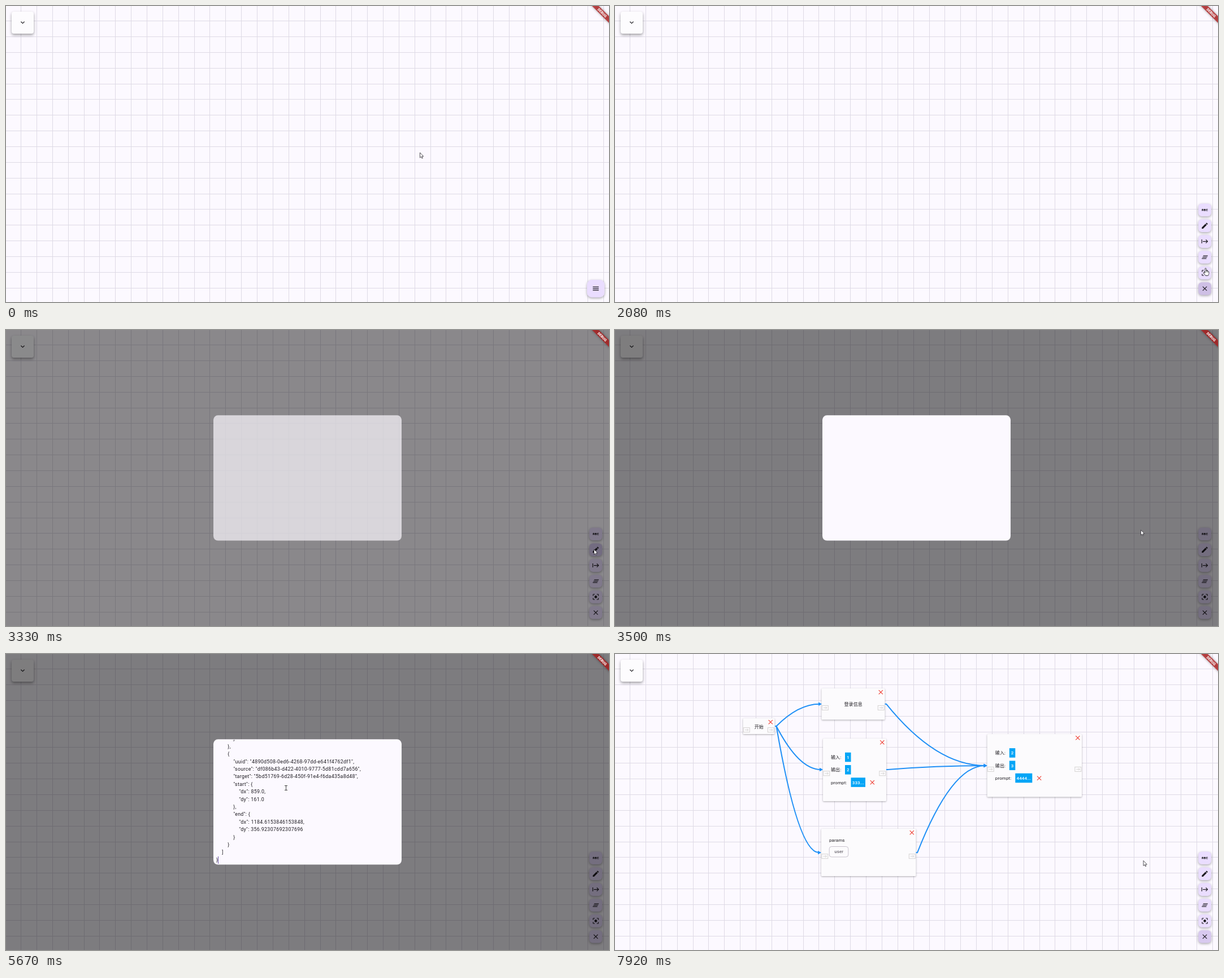
Animation, 1067 px wide and 525 px high, one loop 8000 ms. Source, as an HTML page with a canvas:

```html
<!DOCTYPE html>
<html lang="zh">
<head>
<meta charset="utf-8">
<title>Flow editor</title>
<style>
html, body { margin: 0; width: 100%; height: 100%; overflow: hidden; background: #fcf9ff; }
canvas { display: block; }
</style>
</head>
<body>
<canvas id="stage" width="1067" height="525"></canvas>
<script>
const W = 1067, H = 525, LOOP = 8000, STEP = 1000 / 12;
const ctx = document.getElementById('stage').getContext('2d');
const FONT = 'Roboto, "Noto Sans CJK SC", "Noto Sans CJK", sans-serif';
const SURFACE = '#fcf9ff', EDGE = '#2090f6', BADGE = '#03a5f6', RED = '#ee3b30', INK = '#1d1b20';

// 24-unit icon outlines
const ICONS = {
  menu: 'M3 18h18v-2H3zM3 13h18v-2H3zM3 6v2h18V6z',
  close: 'M19 6.41L17.59 5 12 10.59 6.41 5 5 6.41 10.59 12 5 17.59 6.41 19 12 13.41 17.59 19 19 17.59 13.41 12z',
  more: 'M16.59 8.59L12 13.17 7.41 8.59 6 10l6 6 6-6z',
  focus: 'M12 8a4 4 0 1 0 0 8a4 4 0 1 0 0-8zM5 15H3v4c0 1.1.9 2 2 2h4v-2H5zM5 5h4V3H5c-1.1 0-2 .9-2 2v4h2zM19 3h-4v2h4v4h2V5c0-1.1-.9-2-2-2zM19 19h-4v2h4c1.1 0 2-.9 2-2v-4h-2z',
  clear: 'M5 13h14v-2H5zM3 17h14v-2H3zM7 7v2h14V7z',
  start: 'M14.59 7.41L18.17 11H6v2h12.17l-3.59 3.59L16 18l6-6-6-6zM2 6v12h2V6z',
  edit: 'M3 17.25V21h3.75L17.81 9.94l-3.75-3.75zM20.71 7.04c.39-.39.39-1.02 0-1.41l-2.34-2.34c-.39-.39-1.02-.39-1.41 0l-1.83 1.83 3.75 3.75z',
  abc: 'M21 11h-1.5v-.5h-2v3h2V13H21v1c0 .55-.45 1-1 1h-3c-.55 0-1-.45-1-1v-4c0-.55.45-1 1-1h3c.55 0 1 .45 1 1zM8 10v5H6.5v-1.5h-2V15H3v-5c0-.55.45-1 1-1h3c.55 0 1 .45 1 1zM6.5 10.5h-2V12h2zM13.5 12c.55 0 1 .45 1 1v1c0 .55-.45 1-1 1h-4V9h4c.55 0 1 .45 1 1v1c0 .55-.45 1-1 1zM11 10.5v.75h2v-.75zM13 12.75h-2v.75h2z'
};
for (const name in ICONS) ICONS[name] = new Path2D(ICONS[name]);

const MENU = ['focus', 'clear', 'start', 'edit', 'abc'];
const ARROW = new Path2D('M.5.5V9.6L2.6 7.7 4 10.8 5.3 10.2 4 7.2H6.8Z');
const HAND = new Path2D('M-1 1C-1-.6 1.1-.6 1.1 1V5C1.6 4.3 2.8 4.5 2.9 5.3 3.5 4.8 4.5 5 4.6 5.9 5.3 5.5 6 6 6 6.8V9.4C6 11 5 11.6 5 13H-.6C-.7 11.5-2.4 10.4-3.4 8.4-4 7.2-2.6 6.6-1.9 7.4L-1 8.4Z');

// Pointer keys: step, x, y
const PATH = [
  [0, 732, 259.5], [3, 800, 305], [7, 955, 425], [10, 1028, 481.5], [11, 1035, 489], [14, 1043, 497],
  [22, 1043, 497], [25, 1045, 465], [29, 1043, 415], [32, 1041, 392], [33, 1041, 389], [39, 1041, 389],
  [40, 1040, 388.5], [44, 820, 320], [49, 530, 250], [55, 495.5, 237.5], [69, 495.5, 237.5],
  [73, 660, 285], [77, 847, 345], [79, 847, 345], [83, 786.5, 325], [88, 786.5, 325],
  [90, 800, 337], [91, 800, 337], [92, 818, 334], [95, 934.5, 366]
];

const JSON_LINES = [
  [12, '}'], [8, '},'], [8, '{'],
  [12, '"uuid": "4890d508-0ed6-4268-97dd-e641f4762df1",'],
  [12, '"source": "df086b43-d422-4010-9777-5d81cdd7a656",'],
  [12, '"target": "5bd51769-6d28-450f-91e4-f6da435a8d48",'],
  [12, '"start": {'], [16, '"dx": 859.0,'], [16, '"dy": 161.0'], [12, '},'],
  [12, '"end": {'], [16, '"dx": 1184.6153846153848,'], [16, '"dy": 356.92307692307696'],
  [12, '}'], [8, '}'], [4, ']'], [0, '}']
];

function pointerAt(n) {
  let i = 0;
  while (i < PATH.length - 2 && PATH[i + 1][0] <= n) i++;
  const [a, x0, y0] = PATH[i], [b, x1, y1] = PATH[i + 1];
  const k = Math.min(1, (n - a) / (b - a));
  return [x0 + (x1 - x0) * k, y0 + (y1 - y0) * k];
}

function box(x, y, w, h, r, fill) {
  ctx.fillStyle = fill;
  ctx.beginPath();
  ctx.roundRect(x, y, w, h, r);
  ctx.fill();
}

function raised(x, y, w, h, r, fill, dy = 1, blur = 3, alpha = .32) {
  ctx.save();
  ctx.shadowColor = `rgba(0,0,0,${alpha})`;
  ctx.shadowBlur = blur;
  ctx.shadowOffsetY = dy;
  box(x, y, w, h, r, fill);
  ctx.restore();
}

function text(str, x, y, { color = INK, align = 'left', font = '8px', gap = .1 } = {}) {
  ctx.font = `${font} ${FONT}`;
  ctx.letterSpacing = gap + 'px';
  ctx.textAlign = align;
  ctx.textBaseline = 'alphabetic';
  ctx.fillStyle = color;
  ctx.fillText(str, x, y);
}

function icon(name, x, y, scale = .58, color = INK) {
  ctx.save();
  ctx.translate(x, y);
  ctx.scale(scale, scale);
  ctx.translate(-12, -12);
  ctx.fillStyle = color;
  ctx.fill(ICONS[name], 'evenodd');
  ctx.restore();
}

function line(points, color, width) {
  ctx.strokeStyle = color;
  ctx.lineWidth = width;
  ctx.beginPath();
  points.forEach(([x, y], i) => i ? ctx.lineTo(x, y) : ctx.moveTo(x, y));
  ctx.stroke();
}

function grid() {
  ctx.fillStyle = SURFACE;
  ctx.fillRect(0, 0, W, H);
  ctx.fillStyle = '#deDAe5';
  for (let p = 26.6; p < W; p += 27.865) {
    ctx.fillRect(Math.floor(p), 0, 1, H);
    ctx.fillRect(0, Math.floor(p), W, 1);
  }
}

function cross(x, y) {
  const r = 3.6;
  line([[x - r, y - r], [x + r, y + r]], RED, 1.1);
  line([[x + r, y - r], [x - r, y + r]], RED, 1.1);
}

function port(x, y) {
  const c = '#d5d3d2';
  ctx.strokeStyle = c;
  ctx.lineWidth = 1;
  ctx.strokeRect(x - 5.5, y - 4, 11, 8);
  line([[x - 3, y], [x + 3, y]], c, 1);
  line([[x + 1, y - 2], [x + 3, y], [x + 1, y + 2]], c, 1);
}

// Card with two ports, each on its own side, and a close mark
function card(x, y, w, h, portY) {
  raised(x, y, w, h, 1.5, '#fcfbfd');
  port(x + 6.3, portY);
  port(x + w - 6.7, portY);
  cross(x + w - 7.2, y + 6.8);
}

function badge(x, y, w, label) {
  box(x, y - 8.3, w, 16.6, 0, BADGE);
  text(label, x + w / 2, y + 2.9, { color: '#fff', align: 'center', font: '500 8px' });
}

function fields(x, y, values, wide) {
  ['输入:', '输出:', 'prompt:'].forEach((label, i) => {
    const cy = y + i * 22.3;
    text(label, x, cy + 2.9);
    badge(x + (i < 2 ? 25 : 35.5), cy, i < 2 ? 10.5 : wide, values[i]);
  });
  cross(x + wide + 47.8, y + 44.8);
}

function edge(x0, y0, x1, y1) {
  ctx.strokeStyle = EDGE;
  ctx.lineWidth = 2;
  ctx.beginPath();
  ctx.moveTo(x0, y0);
  ctx.lineTo(x0 + 2.5, y0);
  ctx.quadraticCurveTo((x0 + x1) / 2, y1, x1 - 4, y1);
  ctx.stroke();
  ctx.fillStyle = EDGE;
  ctx.beginPath();
  ctx.moveTo(x1, y1);
  ctx.lineTo(x1 - 6, y1 - 3.2);
  ctx.lineTo(x1 - 6, y1 + 3.2);
  ctx.fill();
}

function diagram() {
  card(226.5, 114, 56, 28, 134.7);
  text('开始', 254.8, 131.6, { align: 'center' });
  card(365.5, 61, 112, 55.5, 95.4);
  text('登录信息', 421.7, 92, { align: 'center' });
  card(368, 150, 112, 111, 211.8);
  fields(382, 183, ['1', '2', '333...'], 25.5);
  card(365, 310, 167.5, 84, 358.8);
  text('params', 379, 332.6);
  ctx.strokeStyle = '#c8c3ce';
  ctx.lineWidth = 1;
  ctx.beginPath();
  ctx.roundRect(379.2, 341.5, 33.6, 18.5, 4);
  ctx.stroke();
  text('user', 396.2, 353.3, { align: 'center', color: '#49454f' });
  card(658.5, 142, 167.5, 111.5, 204.4);
  fields(672.8, 175.4, ['2', '3', '4444...'], 30);

  edge(283, 128, 366, 88.7);
  edge(283, 128, 368, 205);
  edge(283, 128, 365, 352.3);
  edge(477.5, 88.7, 658.5, 198);
  edge(480, 205, 658.5, 198);
  edge(532.5, 352.3, 658.5, 198);
}

function fab(name, cx, cy, size, fill, scale = 1) {
  if (scale <= 0) return;
  ctx.save();
  ctx.translate(cx, cy);
  ctx.scale(scale, scale);
  raised(-size / 2, -size / 2, size, size, size * .27, fill, 1.5, 4, .34);
  icon(name, 0, 0);
  ctx.restore();
}

function controls(n, modal) {
  raised(10, 10, 39, 39, 4, '#fdfcfe', 2.5, 5, .36);
  icon('more', 29.5, 29.3);

  const open = Math.max(0, Math.min(1, (n - 17) / 4));
  const hovered = n >= 32 && n <= 40;
  MENU.forEach((name, i) => {
    const grow = Math.max(0, Math.min(1, open * 1.6 - i * .15));
    fab(name, 1043.6, 473.4 - i * 27.9, 22.6, name === 'edit' && hovered ? '#d3c5eb' : '#eaddff', grow);
  });

  let fill = '#eaddff';
  if (n >= 12 && n < 18) fill = '#dacbf0';
  else if (n >= 18 && n < 26) fill = '#cebfe5';
  else if (n >= 26 && !modal) fill = '#d8c9ef';
  fab(open > .5 ? 'close' : 'menu', 1043.6, 501.3, 31 - 8.4 * open, fill);
}

function dialog(n) {
  const opening = n === 40;
  ctx.fillStyle = `rgba(0,0,0,${opening ? .455 : .5})`;
  ctx.fillRect(0, 0, W, H);
  ctx.save();
  ctx.globalAlpha = opening ? .69 : 1;
  box(367, 151.3, 333, 222.2, 8, SURFACE);
  ctx.restore();

  const pasted = n >= 65;
  if (pasted) {
    ctx.save();
    ctx.beginPath();
    ctx.rect(367, 152, 333, 221);
    ctx.clip();
    JSON_LINES.forEach(([indent, str], i) =>
      text(' '.repeat(indent) + str, 372, 153.4 + i * 13.4, { font: '8.83px', gap: .33 }));
    ctx.restore();
  }
  // The caret toggles every half second after focus and after the paste
  const since = n - (pasted ? 65 : 51);
  if (since >= 0 && Math.floor(since / 6) % 2 === 0) {
    ctx.fillStyle = '#6750a4';
    if (pasted) ctx.fillRect(375, 359, 1, 13);
    else ctx.fillRect(372, 152, 1, 14);
  }
}

function banner() {
  ctx.save();
  ctx.translate(W, 0);
  ctx.rotate(Math.PI / 4);
  raised(-32, 12.8, 64, 8.4, 0, 'rgba(183,28,28,.75)', 0, 4, .5);
  text('DEBUG', 0, 19.2, { color: '#fff', align: 'center', font: '900 6.3px', gap: 0 });
  ctx.restore();
}

function pointer(n, modal) {
  const [x, y] = pointerAt(n);
  ctx.save();
  ctx.translate(x, y);
  if (modal && x > 367 && x < 700) {
    line([[-2.5, -4], [2.5, -4]], '#444', 1);
    line([[0, -4], [0, 4]], '#444', 1);
    line([[-2.5, 4], [2.5, 4]], '#444', 1);
  } else {
    const shape = n >= 11 && n < 40 ? HAND : ARROW;
    ctx.fillStyle = '#fff';
    ctx.strokeStyle = '#2b2930';
    ctx.lineWidth = .8;
    ctx.lineJoin = 'round';
    ctx.fill(shape);
    ctx.stroke(shape);
    if (shape === HAND) {
      line([[1.1, 5], [1.1, 7.5]], '#2b2930', .6);
      line([[2.9, 5.4], [2.9, 7.5]], '#2b2930', .6);
      line([[4.6, 6], [4.6, 7.8]], '#2b2930', .6);
    }
  }
  ctx.restore();
}

function draw(ms) {
  const n = Math.floor((ms + 4) / STEP);
  const modal = n >= 40 && n < 85;
  ctx.clearRect(0, 0, W, H);
  grid();
  if (n >= 84) diagram();
  controls(n, modal);
  if (modal) dialog(n);
  banner();
  pointer(n, modal);
}

const begin = performance.now();
function tick() {
  draw((performance.now() - begin) % LOOP);
  requestAnimationFrame(tick);
}
tick();
</script>
</body>
</html>
```
